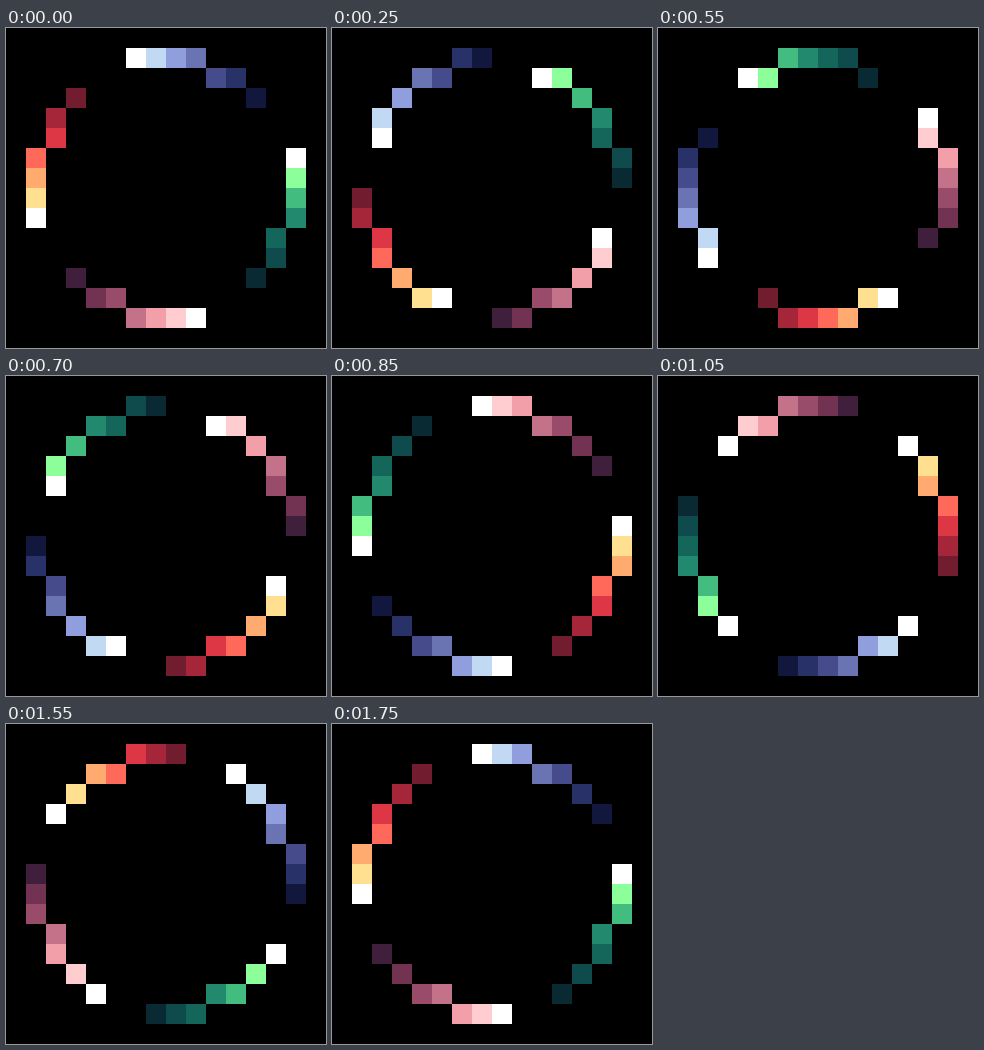
Animation of 320x320 px, one loop 1800 ms. Source, as an HTML page:

```html
<!DOCTYPE html>
<html lang="en">
<head>
<meta charset="utf-8">
<title>Pixel ring</title>
<style>
  html, body { margin: 0; width: 100%; height: 100%; overflow: hidden; background: #000; }
  svg { display: block; width: 100vw; height: 100vh; }
</style>
</head>
<body>
<svg id="stage" viewBox="0 0 16 16" shape-rendering="crispEdges"></svg>
<script>
const STEP_MS = 50;
const GRID = 16;

// Each snake from its head to its tail, in counterclockwise order around the ring.
const snakes = [
  "#ffffff #c1d9f2 #909edd #6b74b2 #464b8c #293268 #12173d",
  "#ffffff #ffe091 #ffaa6e #ff695a #dd3745 #a52639 #721c2f",
  "#ffffff #ffccd0 #f29faa #c37289 #994c69 #723352 #3f1f3c",
  "#ffffff #8cff9b #42bc7f #22896e #14665b #0f4a4c #0a2a33",
].map(colors => colors.split(" "));

// A quarter of the ring, turned three times to close the circle.
const quarter = [[6, 1], [5, 2], [4, 2], [3, 3], [2, 4], [2, 5], [1, 6], [1, 7], [1, 8]];
const ring = [];
for (let turn = 0, part = quarter; turn < 4; turn++) {
  ring.push(...part);
  part = part.map(([x, y]) => [y, GRID - 1 - x]);
}

const stage = document.getElementById("stage");

function addCell(color) {
  const cell = document.createElementNS("http://www.w3.org/2000/svg", "rect");
  cell.setAttribute("width", 1);
  cell.setAttribute("height", 1);
  cell.setAttribute("fill", color);
  return stage.appendChild(cell);
}

const cells = snakes.flatMap((colors, snake) =>
  colors.map((color, lag) => ({ node: addCell(color), offset: snake * quarter.length - lag })));

function draw(time) {
  const step = Math.floor(time / STEP_MS) % ring.length;
  for (const { node, offset } of cells) {
    const [x, y] = ring[(step + offset + ring.length) % ring.length];
    node.setAttribute("x", x);
    node.setAttribute("y", y);
  }
}

let start;
function tick(now) {
  start ??= now;
  draw(now - start);
  requestAnimationFrame(tick);
}

draw(0);
requestAnimationFrame(tick);
</script>
</body>
</html>
```
